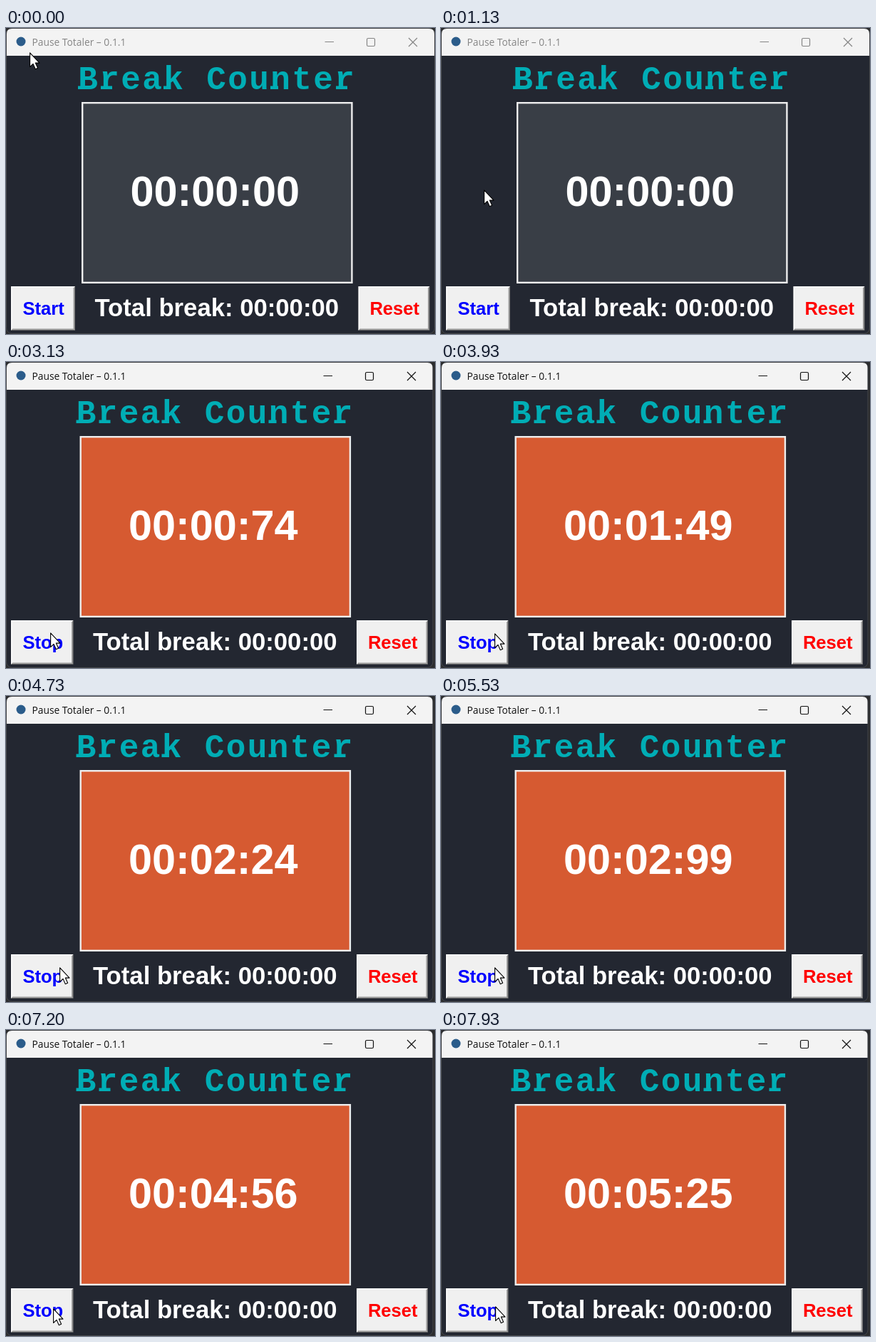
Write an HTML page that moves like this. It is 602x430 px and loops after 8 s.

```html
<!DOCTYPE html>
<html lang="en">
<head>
<meta charset="utf-8">
<title>Pause Totaler</title>
<style>
  html, body { margin: 0; width: 602px; height: 430px; overflow: hidden; background: #2b2c2e; }
  svg { display: block; }
  text { white-space: pre; font-kerning: none; }
  .bold { font: bold 25.6px "Liberation Sans", Arial, sans-serif; }
  .head { font: bold 46px "Liberation Mono", "Courier New", monospace; letter-spacing: 2.4px; }
  .title { font: 13.8px "Open Sans", "Noto Sans", sans-serif; }
</style>
</head>
<body>
<svg width="602" height="430" viewBox="0 0 602 430">
  <rect width="602" height="430" fill="#2b2c2e"/>
  <rect id="frame" x="0.5" y="0.5" height="429" rx="8" fill="#232731" stroke="#45474a"/>
  <path id="bar" fill="#f3f3f3"/>
  <circle cx="21" cy="19" r="6.5" fill="#2b5c8a"/>
  <text id="title" class="title" x="36.5" y="25">Pause Totaler – 0.1.1</text>
  <g id="icons" fill="none" stroke-width="1.2">
    <path d="M447.5 19.5H460M565 14L577 26M577 14L565 26"/>
    <rect x="506.5" y="14.5" width="11" height="11" rx="1.8"/>
  </g>
  <g id="middle">
    <text class="head" x="101.2" y="86" fill="#00adb5">Break Counter</text>
    <path id="feet" stroke="#00adb5" stroke-width="4.5"/>
    <rect id="panel" x="107.2" y="105.2" width="378.2" height="252.6" stroke="#eee" stroke-width="2.4"/>
    <text id="clock" class="bold" x="174.4" y="250" fill="#fff" style="font-size:59.4px"></text>
    <text class="bold" x="124.5" y="405" fill="#fff" style="font-size:34.7px">Total break: 00:00:00</text>
    <g id="reset"></g>
  </g>
  <g id="toggle"></g>
  <path id="cursor" d="M.6 .8V20.6L5 16.4L8.3 23.8L11.6 22.3L8.3 15.1H14Z"
        fill="#fff" stroke="#000" stroke-width="1.1" stroke-linejoin="round"/>
</svg>
<script>
const LOOP = 8000, PRESS = 2270, RELEASE = 2330;
const $ = id => document.getElementById(id);
const set = (id, attrs) => {
  for (const name in attrs) $(id).setAttribute(name, attrs[name]);
};

// Pointer moves: from, until, to x, to y
const moves = [
  [0, 730, 61, 190], [930, 1130, 60, 227], [1270, 1600, 54, 290], [1600, 2070, 60, 381],
  [2270, 2400, 62, 380], [3130, 3670, 75, 381], [6200, 6470, 70, 391],
  [6470, 6530, 66, 391], [7400, 7930, 76, 388]
];

function pointer(t) {
  let x = 33, y = 34;
  for (const [from, until, toX, toY] of moves) {
    const p = Math.min(1, Math.max(0, (t - from) / (until - from)));
    x += (toX - x) * p;
    y += (toY - y) * p;
  }
  return `${Math.round(x)} ${Math.round(y)}`;
}

// The screen refreshes 15 times a second, on 10 ms ticks
const tick = k => Math.round(k * 20 / 3) * 10;
function refreshTime(t) {
  let k = Math.floor(t * 15 / 1000) + 1;
  while (tick(k) > t) k--;
  return tick(k);
}

function clockText(t) {
  const n = Math.max(0, Math.floor((t - 2342.5) * 0.094));
  const two = v => String(v).padStart(2, '0');
  return [Math.floor(n / 6000), Math.floor(n / 100) % 60, n % 100].map(two).join(':');
}

function button(x, w, label, color, textX, sunken) {
  const y = 363, h = 62, r = x + w, b = y + h, d = sunken ? 1.5 : 0;
  const [light, dark, soft] = sunken
    ? ['#696969', '#fff', '#e3e3e3'] : ['#fff', '#777', '#a0a0a0'];
  return `<rect x="${x}" y="${y}" width="${w}" height="${h}" fill="${dark}"/>
    <path d="M${x} ${b}V${y}H${r}l-2 2V${b - 2}H${x + 2}Z" fill="${light}"/>
    <path d="M${x + 2} ${b - 1}H${r - 1}V${y + 2}h-2V${b - 3}H${x + 2}Z" fill="${soft}"/>
    <rect x="${x + 1.5}" y="${y + 1.5}" width="${w - 4}" height="${h - 4}" fill="#f0f0f0"/>
    <text class="bold" x="${textX + d}" y="${402.5 + d}" fill="${color}">${label}</text>`;
}

// Slab feet for the heading: one bar at the baseline under each upright stem
function feet() {
  const stems = { B: [1, 10], r: [3, 19], k: [1, 11], n: [1, 12] };
  return [...'Break Counter'].map((c, i) => {
    if (!stems[c]) return '';
    const [a, b] = stems[c];
    return `M${100 + i * 30 + a} 83.8h${b - a}`;
  }).join('');
}

function draw(time) {
  const t = refreshTime(time);
  const running = t >= RELEASE, active = t >= PRESS, pressed = active && !running;
  const shift = running ? -2.5 : 0, right = 601 + shift;
  const ink = active ? '#111' : '#858585';

  set('frame', { width: right });
  set('bar', { d: `M1 39V8Q1 1 8 1H${right - 7}Q${right} 1 ${right} 8V39Z` });
  set('title', { fill: ink });
  set('icons', { stroke: ink, transform: `translate(${running ? -2 : 0})` });
  set('middle', { transform: `translate(${shift})` });
  set('panel', { fill: running ? '#d65a31' : '#393e46' });
  $('clock').textContent = clockText(t);
  $('toggle').innerHTML = button(7, 90 + shift, running ? 'Stop' : 'Start',
    pressed ? '#000' : '#00f', 23.4, pressed);
  set('cursor', { transform: `translate(${pointer(t)})` });
}

function loop() {
  draw(performance.now() % LOOP);
  requestAnimationFrame(loop);
}

set('feet', { d: feet() });
$('reset').innerHTML = button(494.5, 100, 'Reset', '#f00', 510.4, false);
loop();
</script>
</body>
</html>
```
